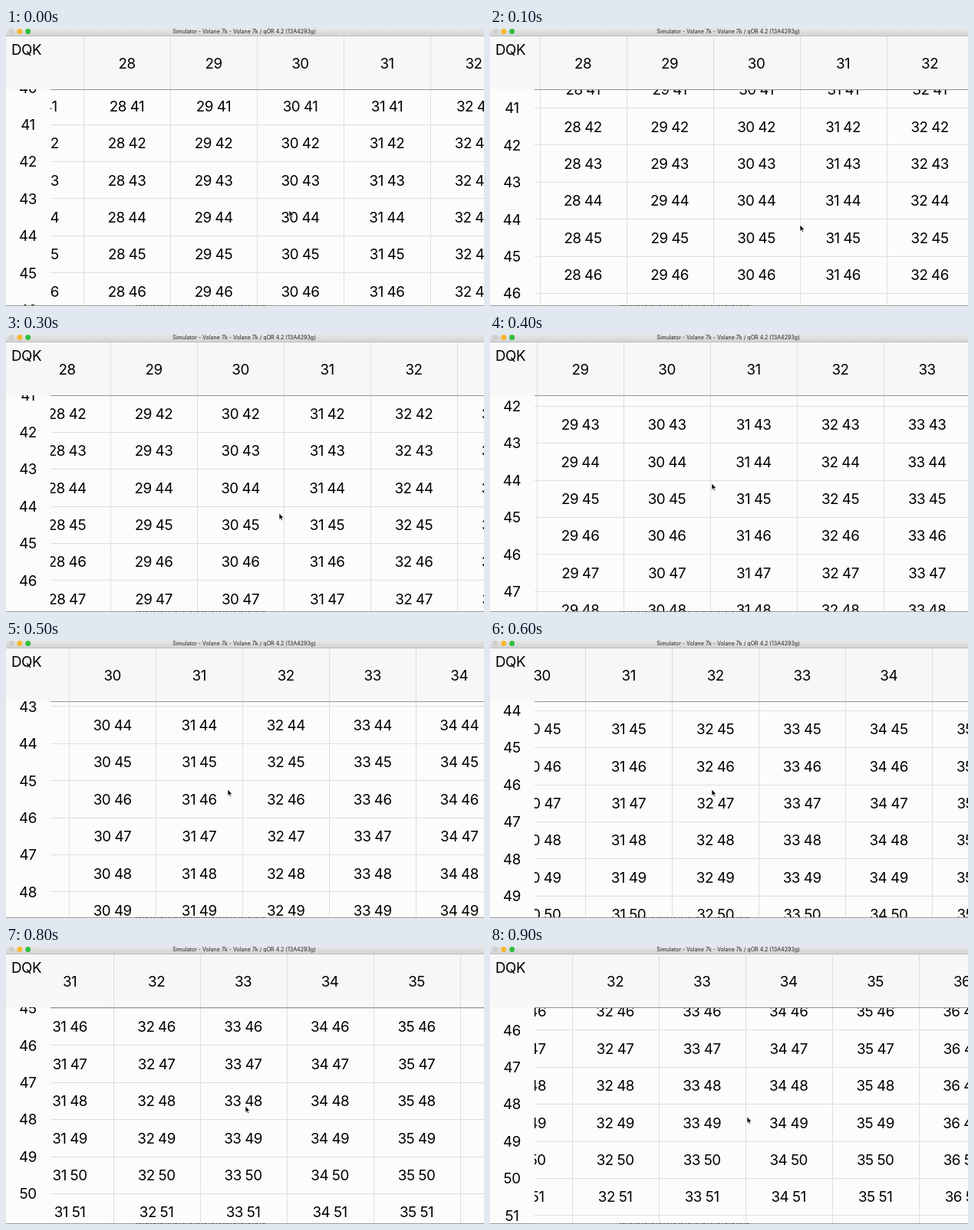
Animation of 623 by 363 pixels, one loop 1 s. Source, as an HTML page:

```html
<!DOCTYPE html>
<html>
<head>
<meta charset="utf-8">
<style>
  html, body { margin: 0; height: 100%; overflow: hidden; background: #fcfcfb; }
  svg { display: block; }
  text { font: 18.8px Inter, Roboto, sans-serif; letter-spacing: -0.5px; text-anchor: middle; }
  #title { font-size: 7.1px; letter-spacing: 0; fill: #222; }
  .rule { stroke: #dedede; }
</style>
</head>
<body>
<svg width="623" height="363" viewBox="0 0 623 363">
  <defs>
    <linearGradient id="bar" x2="0" y2="1">
      <stop stop-color="#e8e8e8"/><stop offset="1" stop-color="#d3d3d3"/>
    </linearGradient>
  </defs>
  <rect width="623" height="363" fill="#fcfcfb"/>
  <rect y="10" width="623" height="70" fill="#f7f7f7"/>
  <svg id="head" x="58" y="11" width="565" height="69" viewBox="58 11 565 69"></svg>
  <svg id="cells" x="58" y="80" width="565" height="282" viewBox="58 80 565 282"></svg>
  <svg id="side" y="80" width="58" height="282" viewBox="0 80 58 282"></svg>
  <path d="M58 80.5H623" stroke="#929292"/>
  <text x="26.5" y="35.3">DQK</text>
  <rect width="623" height="10" fill="url(#bar)"/>
  <path d="M0 10.5H623" stroke="#bdbdbd"/>
  <circle cx="7" cy="4.5" r="3.4" fill="#cecece"/>
  <circle cx="17.8" cy="4.5" r="3.4" fill="#f8b62b"/>
  <circle cx="28.7" cy="4.5" r="3.4" fill="#2bc03c"/>
  <text id="title" x="310.5" y="7.4">Simulator - Volane 7k - Volane 7k / qOR 4.2 (13A4293g)</text>
  <path d="M0 362.5H623" stroke="#9c9c9c"/>
  <path d="M169 362.5H340" stroke="#555" stroke-dasharray="2 1.5 4 2"/>
  <path id="cursor" d="M0 0V8.4L1.9 6.7 3.2 9.6 4.6 9 3.3 6.2H5.9Z" stroke="#fff" stroke-width=".7"/>
</svg>
<script>
const COL_W = 113, ROW_H = 48.4, STEP = 100, STEPS = 10;

// The grid coasts, is dragged, then flung; speed shrinks by `keep` each step
const glides = [
  { steps: 3, vx: -36.4, vy: -21.6, keep: 0.68 },
  { steps: 1, vx: -75, vy: -34, keep: 1 },
  { steps: 5, vx: -91.8, vy: -55.7, keep: 0.774 }
];

// Cursor tip at its turning points: step, x, y
const cursorPath = [[0, 369, 238], [1, 404, 257], [3, 356, 234], [4, 289, 195], [7, 289, 195], [9, 335, 223]];

const $ = id => document.getElementById(id);
const label = (s, x, y) => `<text x="${x - 0.5}" y="${y + 6.8}">${s}</text>`;
const rule = d => `<path class="rule" d="${d}"/>`;
const snap = v => Math.floor(v) + 0.5;

// Left edge of column 28 and bottom edge of row 41
function scrollAt(step) {
  let x = 101.5, y = 126.1;
  for (const { steps, vx, vy, keep } of glides) {
    for (let i = 0; i < steps && step > 0; i++, step--) {
      x += vx * keep ** i;
      y += vy * keep ** i;
    }
  }
  return [x, y];
}

function cursorAt(step) {
  const i = cursorPath.findIndex((p, k) => k > 0 && p[0] >= step);
  const [a, x0, y0] = cursorPath[i - 1], [b, x1, y1] = cursorPath[i];
  const t = (step - a) / (b - a);
  return [x0 + (x1 - x0) * t, y0 + (y1 - y0) * t];
}

// Visible [number, position] pairs along one axis
function visible(first, start, pitch, end) {
  const list = [];
  const skip = Math.floor(-start / pitch);
  for (let n = skip; start + n * pitch < end; n++) list.push([first + n, start + n * pitch]);
  return list;
}

function draw(step) {
  const [left, bottom] = scrollAt(step);
  const cols = visible(28, left, COL_W, 623);
  const rows = visible(41, bottom, ROW_H, 363 + ROW_H);
  let head = '', cells = '', side = '';
  for (const [n, x] of cols) {
    const line = rule(`M${snap(x)} 11V362`);
    head += line + label(n, x + COL_W / 2, 46);
    cells += line;
  }
  for (const [r, y] of rows) {
    cells += rule(`M58 ${snap(y)}H623`);
    for (const [c, x] of cols) cells += label(`${c} ${r}`, x + COL_W / 2, y - ROW_H / 2);
    side += label(r, 29, y);
  }
  $('head').innerHTML = head;
  $('cells').innerHTML = cells;
  $('side').innerHTML = side;
  $('cursor').setAttribute('transform', `translate(${cursorAt(step)})`);
}

let shown = -1;
function tick() {
  const step = Math.floor(performance.now() / STEP) % STEPS;
  if (step !== shown) draw(shown = step);
  requestAnimationFrame(tick);
}
tick();
</script>
</body>
</html>
```
